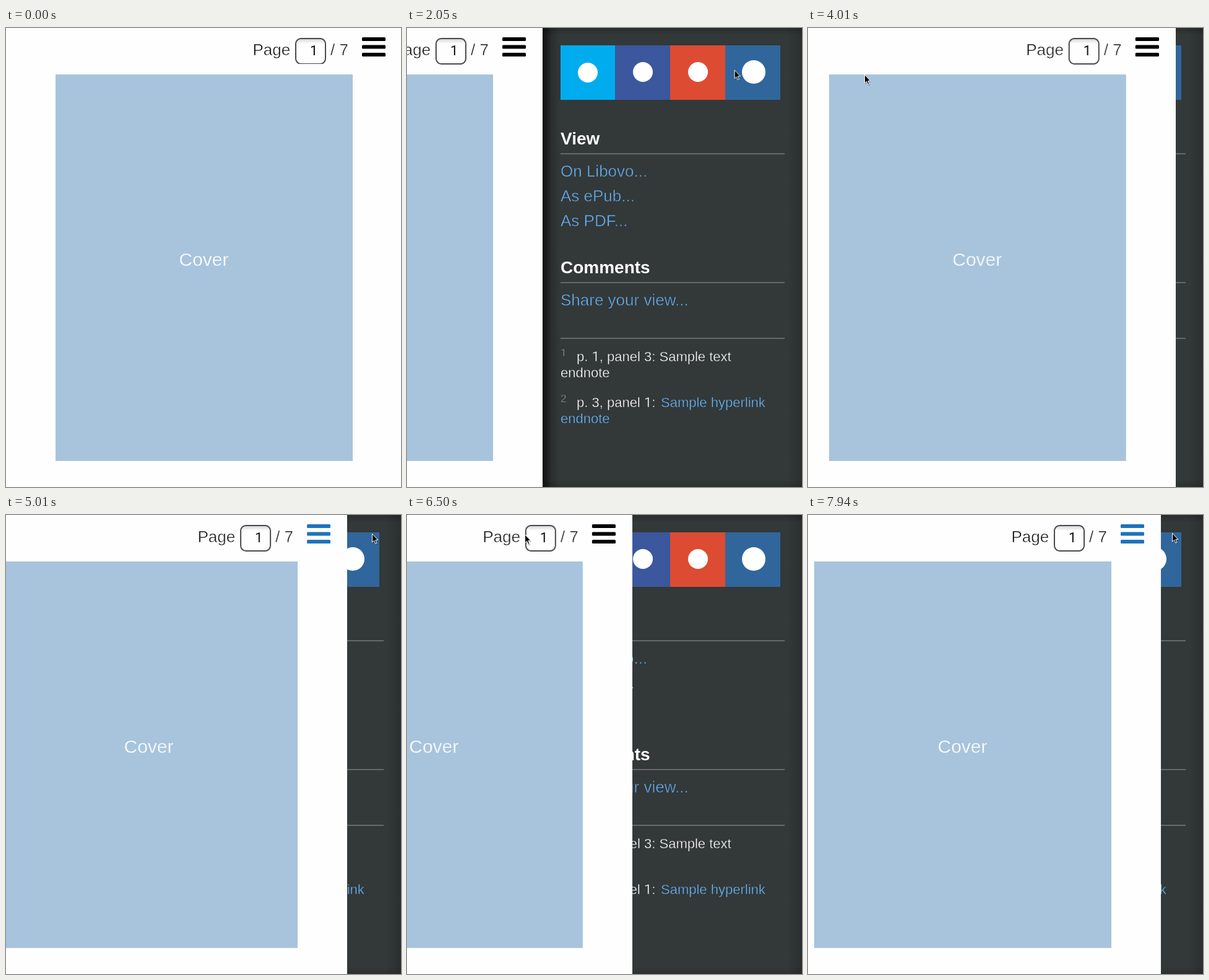
Recreate the animation shown at these times as an HTML page. Size 638 px wide and 741 px high, loop 8000 ms.

```html
<!DOCTYPE html>
<html lang="en">
<head>
<meta charset="utf-8">
<title>Sliding reader menu</title>
<style>
  html, body { margin: 0; width: 100%; height: 100%; overflow: hidden; background: #5b5b5b; }
  svg { display: block; width: 638px; height: 741px; }
  text { font-family: "Liberation Sans", Arial, sans-serif; white-space: pre; }
  .one { font-family: Roboto, sans-serif; }
  /* A background-coloured outline gives the light weight. */
  .thin { stroke-width: .6px; font-size: 26px; }
  .ink { fill: #0c0c0c; stroke: #fefefe; }
  .link { fill: #65b4f8; stroke: #333838; }
  .note { fill: #fff; stroke: #333838; stroke-width: .4px; font-size: 22px; }
  .note .link { stroke-width: .4px; }
  .sup { fill: #8f9292; font-size: 17px; stroke: #333838; stroke-width: .4px; }
  .head { fill: #fff; font-size: 28px; font-weight: bold; }
</style>
</head>
<body>
<svg viewBox="0 0 638 741">
  <defs>
    <linearGradient id="left">
      <stop offset="0" stop-color="#000" stop-opacity=".72"/>
      <stop offset=".2" stop-color="#000" stop-opacity=".55"/>
      <stop offset=".5" stop-color="#000" stop-opacity=".2"/>
      <stop offset="1" stop-color="#000" stop-opacity="0"/>
    </linearGradient>
    <linearGradient id="right">
      <stop offset="0" stop-color="#000" stop-opacity="0"/>
      <stop offset="1" stop-color="#000" stop-opacity=".17"/>
    </linearGradient>
    <linearGradient id="top" x2="0" y2="1">
      <stop offset="0" stop-color="#000" stop-opacity=".2"/>
      <stop offset="1" stop-color="#000" stop-opacity="0"/>
    </linearGradient>
    <linearGradient id="bottom" x2="0" y2="1">
      <stop offset="0" stop-color="#000" stop-opacity="0"/>
      <stop offset="1" stop-color="#000" stop-opacity=".15"/>
    </linearGradient>
    <linearGradient id="field" x2="0" y2="1">
      <stop offset="0" stop-color="#d2d2d2"/>
      <stop offset=".2" stop-color="#fefefe"/>
    </linearGradient>
  </defs>

  <rect width="638" height="741" fill="#5b5b5b"/>

  <g id="menu">
    <rect x="218" width="420" height="741" fill="#333838"/>
    <rect x="218" width="30" height="741" fill="url(#left)"/>
    <rect x="614" width="24" height="741" fill="url(#right)"/>
    <rect x="218" width="420" height="12" fill="url(#top)"/>
    <rect x="218" y="729" width="420" height="12" fill="url(#bottom)"/>

    <rect x="248" y="28" width="88" height="88" fill="#00aced"/>
    <rect x="336" y="28" width="89" height="88" fill="#3b579d"/>
    <rect x="425" y="28" width="89" height="88" fill="#de4b33"/>
    <rect x="514" y="28" width="89" height="88" fill="#30669c"/>
    <g fill="#fff">
      <circle cx="292" cy="72" r="16"/>
      <circle cx="381" cy="71" r="16"/>
      <circle cx="470" cy="71" r="16"/>
      <circle cx="560" cy="71" r="19"/>
    </g>

    <path d="M248 203H610M248 411H610M248 501H610" stroke="#666969" stroke-width="2"/>
    <text class="head" x="248" y="188">View</text>
    <text class="thin link" x="248" y="240">On Libovo...</text>
    <text class="thin link" x="248" y="280">As ePub...</text>
    <text class="thin link" x="248" y="320">As PDF...</text>
    <text class="head" x="248" y="396">Comments</text>
    <text class="thin link" x="248" y="448">Share your view...</text>

    <text class="sup one" x="248" y="530">1</text>
    <text class="note" x="274" y="538">p. <tspan class="one">1</tspan>, panel 3: Sample text</text>
    <text class="note" x="248" y="564">endnote</text>
    <text class="sup" x="248" y="604">2</text>
    <text class="note" x="274" y="612">p. 3, panel <tspan class="one">1</tspan>: <tspan class="link" x="410">Sample hyperlink</tspan></text>
    <text class="note" x="248" y="638"><tspan class="link">endnote</tspan></text>
  </g>

  <g id="page">
    <rect width="640" height="741" fill="#fefefe"/>
    <text class="thin ink" x="398.5" y="44">Page</text>
    <rect x="468" y="17" width="48" height="41" rx="8.5" fill="url(#field)" stroke="#4a4a4a" stroke-width="2"/>
    <rect id="trim" x="466" y="58" width="52" height="2" fill="#fefefe"/>
    <text class="one" x="491" y="44" font-size="22" fill="#0c0c0c">1</text>
    <text class="thin ink" x="524" y="44">/ 7</text>
    <g id="bars">
      <rect x="575" y="15" width="38" height="6" rx="1.5"/>
      <rect x="575" y="27.5" width="38" height="6" rx="1.5"/>
      <rect x="575" y="40" width="38" height="6" rx="1.5"/>
    </g>
    <rect x="80" y="75" width="480" height="624" fill="#a8c4dd"/>
    <text x="279.5" y="384" font-size="30" fill="#fff" stroke="#a8c4dd" stroke-width=".4">Cover</text>
  </g>

  <g id="cursor">
    <path id="arrow" d="M.5 .5V14L3.6 11.2L5.9 16.4L8 15.5L5.8 10.4H9.8Z" transform="translate(.8 1.6)" fill="#000" opacity=".25" stroke="#000"/>
    <path d="M.5 .5V14L3.6 11.2L5.9 16.4L8 15.5L5.8 10.4H9.8Z" fill="#000" stroke="#fff"/>
  </g>
</svg>

<script>
const LOOP = 8000;
const OPEN = -422, PULLED = -509;
const BLUE = '#1f72bd', BLACK = '#000';

// rows: [time, value, easing to the next row]
function play(id, prop, rows, show = v => v) {
  const frames = rows.map(([t, v, easing = 'linear']) =>
    ({ offset: t / LOOP, [prop]: show(v), easing }));
  document.getElementById(id).animate(frames, { duration: LOOP, iterations: Infinity });
}

play('page', 'transform', [
  [0, 0],
  [1583, 0, 'ease'], [2083, OPEN],
  [3195, OPEN], [3320, -454], [3600, PULLED, 'ease-out'],
  [3692, PULLED, 'ease'], [4192, 0],
  [4930, 0, 'ease'], [5430, OPEN],
  [6390, OPEN, 'ease'], [6890, 0],
  [7870, 0, 'ease-in'], [7940, -70], [LOOP, -70]
], x => `translate(${x}px, 0px)`);

play('cursor', 'transform', [
  [0, [593, -26]], [975, [593, -26], 'ease-out'],
  [1300, [592, 15]], [1720, [592, 15], 'ease-in-out'],
  [2400, [459, 125], 'ease-out'], [2920, [179, 71]],
  [3180, [179, 71], 'ease-in'], [3320, [139, 72], 'ease-out'],
  [3640, [91, 75]], [4120, [91, 75], 'ease-in-out'],
  [4780, [591, 30]], [5060, [591, 30], 'ease-in-out'],
  [5570, [238, 49], 'ease-out'], [5740, [205, 31], 'ease-out'],
  [5910, [190, 31]], [6860, [190, 31], 'ease-in-out'],
  [7840, [588, 29]], [LOOP, [588, 29]]
], ([x, y]) => `translate(${x}px, ${y}px)`);

const hold = 'steps(1, end)';
play('bars', 'fill', [
  [0, BLACK, hold], [4680, BLUE, hold], [6380, BLACK, hold], [7700, BLUE, hold], [LOOP, BLUE]
]);
play('trim', 'opacity', [[0, 1, hold], [1583, 0, hold], [LOOP, 0]]);
</script>
</body>
</html>
```
